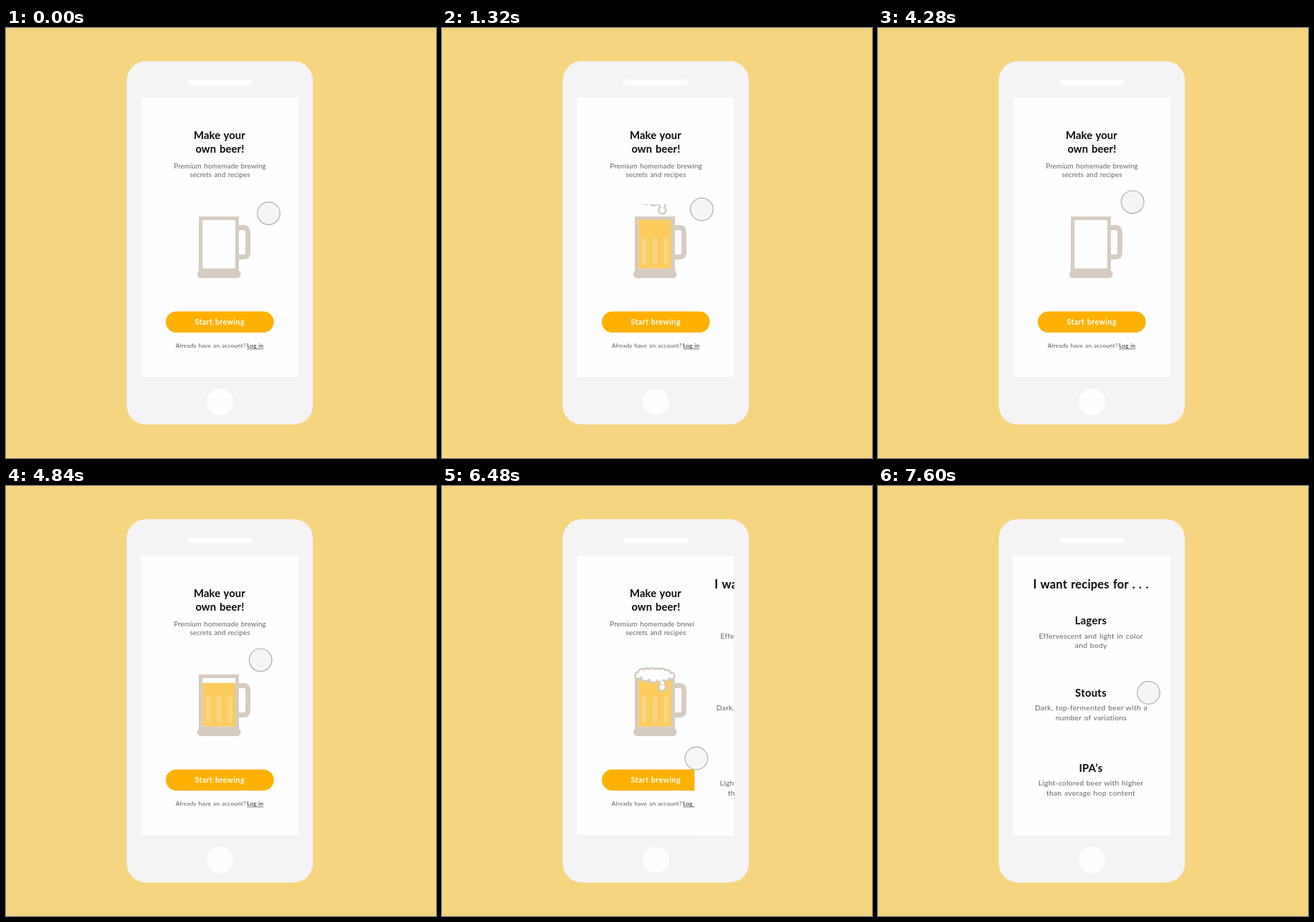
These frames come from a looping animation (600 by 600 pixels, 8.4 s). An HTML page:

```html
<!DOCTYPE html>
<html lang="en">
<head>
<meta charset="utf-8">
<title>Brewing app</title>
<style>
  html, body { margin: 0; width: 100%; height: 100%; overflow: hidden; background: #f5d57f; }
  svg { display: block; width: 100vw; height: 100vh; }
  text { font-family: Lato, "Open Sans", sans-serif; text-anchor: middle; word-spacing: .07em; }
  .title { font-weight: 700; font-size: 14.8px; letter-spacing: .1px; fill: #0b0b0b; }
  .lead { font-size: 9.7px; letter-spacing: .11px; fill: #666; }
  .label { font-weight: 700; font-size: 10.6px; letter-spacing: .4px; fill: #fffdf6; }
  .note { font-size: 8.3px; letter-spacing: .16px; fill: #5c5c5c; }
  .link { font-weight: 700; font-size: 8.3px; letter-spacing: .05px; fill: #555; text-decoration: underline; }
  .head { font-weight: 700; font-size: 16.5px; letter-spacing: .15px; fill: #0b0b0b; }
  .name { font-weight: 700; font-size: 14.8px; letter-spacing: .3px; fill: #0b0b0b; }
  .body { font-size: 10.4px; letter-spacing: .22px; fill: #666; }
</style>
</head>
<body>
<svg viewBox="0 0 600 600">
  <defs>
    <clipPath id="screenClip"><rect x="188.5" y="97" width="219.5" height="391"/></clipPath>
    <clipPath id="foamClip"><rect x="260" y="246" width="75" height="60"/></clipPath>
    <clipPath id="beerClip"><rect id="level" x="274" width="47" y="267" height="69"/></clipPath>
  </defs>

  <rect width="600" height="600" fill="#f5d57f"/>
  <rect x="168.3" y="46.3" width="260" height="507" rx="27" fill="#f4f3f6"/>
  <rect x="253" y="72" width="91" height="8" rx="4" fill="#fefdff"/>
  <circle cx="298.5" cy="521.7" r="18.5" fill="#fefdff"/>
  <rect x="188.5" y="97" width="219.5" height="390" fill="#fefdff"/>

  <g id="home">
    <text class="title" x="298" y="155">Make your</text>
    <text class="title" x="298.4" y="174.4">own beer!</text>
    <text class="lead" x="298.5" y="195.6">Premium homemade brewing</text>
    <text class="lead" x="298.5" y="208">secrets and recipes</text>

    <path d="M323 278.5h8.5q6 0 6 6v29q0 6-6 6H323" fill="none" stroke="#d5ccc1" stroke-width="7"/>
    <path d="M269 263h56v77h-56zM274.3 268v67.5h45.7V268z" fill="#d5ccc1" fill-rule="evenodd"/>
    <rect x="267" y="338" width="60.5" height="11" rx="5" fill="#d5ccc1"/>
    <g id="drink">
      <g id="beer" clip-path="url(#beerClip)">
        <rect x="274.3" y="267.5" width="45.7" height="68" fill="#fbcb5e"/>
        <g fill="#f8d57f">
          <rect x="278.3" y="293" width="7" height="37.5" rx="3"/>
          <rect x="293.8" y="293" width="7" height="37.5" rx="3"/>
          <rect x="309" y="293" width="7" height="37.5" rx="3"/>
        </g>
      </g>
      <g clip-path="url(#foamClip)"><g id="foam"></g></g>
    </g>

    <rect x="223" y="395.5" width="150.7" height="29.5" rx="14.75" fill="#feb102"/>
    <text class="label" x="298.2" y="413.8">Start brewing</text>
    <text class="note" x="285.8" y="446.4">Already have an account?</text>
    <text class="link" x="347.8" y="446.4">Log in</text>
  </g>

  <g clip-path="url(#screenClip)">
    <g id="recipes">
      <rect x="188.5" y="97" width="219.5" height="391" fill="#fefdff"/>
      <text class="head" x="297" y="143.4">I want recipes for . . .</text>
      <text class="name" x="297" y="193.2">Lagers</text>
      <text class="body" x="297.2" y="212.6">Effervescent and light in color</text>
      <text class="body" x="297.2" y="226">and body</text>
      <text class="name" x="297" y="293.9">Stouts</text>
      <text class="body" x="297.4" y="313.2">Dark, top-fermented beer with a</text>
      <text class="body" x="297.4" y="326.8">number of variations</text>
      <text class="name" x="297" y="399.2">IPA’s</text>
      <text class="body" x="297" y="418.4">Light-colored beer with higher</text>
      <text class="body" x="297" y="432">than average hop content</text>
    </g>
  </g>

  <circle id="cursor" r="15.8" fill="#f1f0f3" fill-opacity=".6" stroke="#adadad" stroke-width="1.2"/>
</svg>

<script>
const LOOP = 8400;
const $ = id => document.getElementById(id);
const [level, drink, foam, recipes, cursor] =
  ['level', 'drink', 'foam', 'recipes', 'cursor'].map($);

// Foam: overlapping bubbles, drawn once larger for the outline and once in white.
const bubbles = [
  [274, 264.5, 3.2], [279, 260.5, 4], [286, 260, 4.2], [293, 259.5, 4], [300, 260, 4.2],
  [307, 260, 4], [314, 262, 4], [320, 265, 3.2], [284, 267, 4.3], [295, 268.3, 4.8],
  [304, 267.5, 4.6], [312, 266.5, 4], [307.4, 274.5, 2.6], [307.4, 281, 3.6]
];
const layer = (fill, grow) => bubbles.map(([x, y, r]) =>
  `<circle cx="${x}" cy="${y}" r="${r + grow}" fill="${fill}"/>`).join('');
const core = '<path d="M274 263L286 259H308L320 265L308 269H284Z" fill="#fefdff"/>';
foam.innerHTML = layer('#d5ccc1', 2.7) + layer('#fefdff', 0) + core;

const ratio = (t, a, b) => Math.min(1, Math.max(0, (t - a) / (b - a)));
const ease = (t, a, b) => {
  const p = ratio(t, a, b);
  return p < .5 ? 4 * p ** 3 : 1 - 4 * (1 - p) ** 3;
};

// [start, end, x, y, sideways bow]
const moves = [
  [1000, 1720, 355.2, 242.8, 0],
  [4990, 5840, 355, 380, 4],
  [7080, 7600, 377.5, 288.5, 0]
];

function cursorAt(t) {
  let x = 366.5, y = 258.6;
  for (const [a, b, tx, ty, bow] of moves) {
    const p = ease(t, a, b);
    x += (tx - x) * p + bow * 4 * p * (1 - p);
    y += (ty - y) * p;
  }
  return [x, y];
}

function draw(t) {
  const again = t >= 3440;
  const fillStart = again ? 4340 : 200;
  const foamStart = again ? 5130 : 1000;

  const height = 69 * ease(t, fillStart, fillStart + 720);
  level.setAttribute('y', 336 - height);
  level.setAttribute('height', height);
  const drop = -41.5 * (1 - ease(t, foamStart, foamStart + 720));
  foam.setAttribute('transform', `translate(0 ${drop})`);
  drink.setAttribute('opacity', again ? 1 : 1 - ratio(t, 3240, 3440));

  const slide = 219.5 * (1 - ease(t, 6190, 6920));
  recipes.setAttribute('transform', `translate(${slide} 0)`);

  const [x, y] = cursorAt(t);
  cursor.setAttribute('cx', x);
  cursor.setAttribute('cy', y);
}

const start = performance.now();
function tick() {
  draw((performance.now() - start) % LOOP);
  requestAnimationFrame(tick);
}
tick();
</script>
</body>
</html>
```
